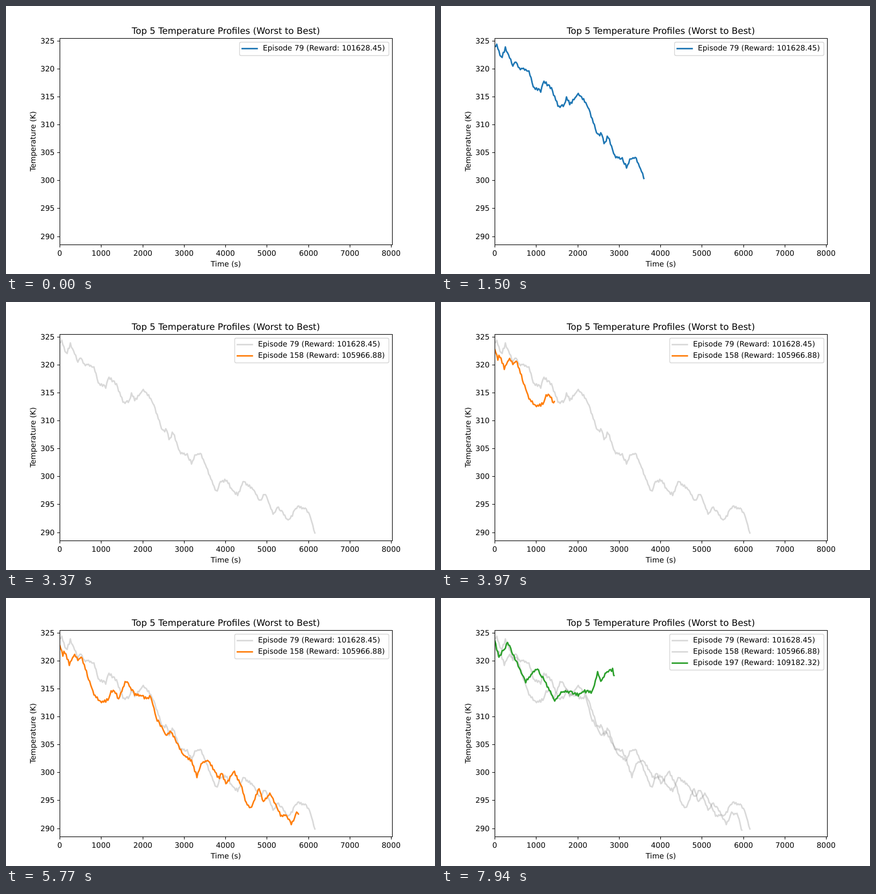
An HTML page for the animation above (8000 ms loop, 800 by 500 pixels).

```html
<!DOCTYPE html>
<html lang="en">
<head>
<meta charset="utf-8">
<title>Temperature profiles</title>
<style>
  html, body { margin: 0; width: 100%; height: 100%; overflow: hidden; background: #fff; }
  svg { display: block; width: 800px; height: 500px; }
  text { font: 13.89px "DejaVu Sans", sans-serif; fill: #000; text-rendering: geometricPrecision; }
  .title { font-size: 16.67px; }
  .mid { text-anchor: middle; }
  .end { text-anchor: end; }
  .axis { fill: none; stroke: #000; stroke-width: 1.11; }
  .line { fill: none; stroke-width: 2.78; stroke-linejoin: round; stroke-linecap: square; }
  .box { fill: #fff; fill-opacity: .8; stroke: #ccc; stroke-opacity: .8; stroke-width: 1.39; }
</style>
</head>
<body>
<svg viewBox="0 0 800 500">
  <clipPath id="plot"><rect x="100" y="60" width="620" height="385"/></clipPath>
  <g id="lines" clip-path="url(#plot)"></g>
  <g id="axes">
    <rect class="axis" x="100.5" y="60.5" width="620" height="385"/>
    <text class="title mid" x="410" y="52">Top 5 Temperature Profiles (Worst to Best)</text>
    <text class="mid" x="410" y="486">Time (s)</text>
    <text class="mid" transform="translate(55 252.5) rotate(-90)">Temperature (K)</text>
  </g>
  <g id="legend">
    <rect class="box" y="67.5" rx="2.8"/>
  </g>
</svg>
<script>
const LOOP = 8000, TICK = 60, FADED = '#808080';
const LEFT = 100, PX = 0.07729;  // plot edge, pixels per second of the time axis
const STRIDE = 144 * PX;         // pixels drawn per tick
const GRAIN = 2, ROUGH = 2.8;    // spacing and height of the zigzag, in pixels

// Each walk is a few key points "x,y" joined by a seeded zigzag.
const series = [
  { name: 'Episode 79 (Reward: 101628.45)', color: '#1f77b4', from: 0, seed: 79,
    keys: `100,76 104,74 113,98 120,78 135,112 139,102 145,116 164,122 173,152 186,158 192,141
      205,152 219,188 229,186 234,172 241,183 257,163 273,185 292,240 300,239 305,258 311,242
      325,282 338,285 346,301 354,284 364,284 392,354 401,335 411,332 424,354 433,359 443,334
      462,351 474,371 483,356 499,398 507,381 527,408 544,381 558,386 568,401 576,431` },
  { name: 'Episode 158 (Reward: 105966.88)', color: '#ff7f0e', from: 3370, seed: 158,
    keys: `100,88 106,108 109,99 118,123 127,106 135,116 140,109 150,138 165,182 177,195 190,190
      197,173 204,175 210,189 223,154 240,179 263,187 270,184 280,224 300,256 307,247 330,292
      345,302 356,333 365,307 378,303 397,337 402,326 411,348 425,323 440,353 448,384 457,392
      472,355 480,380 493,364 512,406 520,404 533,422 541,401 553,403 561,433` },
  { name: 'Episode 197 (Reward: 109182.32)', color: '#2ca02c', from: 6740, seed: 197,
    keys: `100,79 108,110 125,84 158,157 170,139 180,132 193,154 206,180 213,192 224,176 235,174
      258,181 266,174 282,175 292,140 299,156 308,139 320,134 323,145` }
];

const $ = id => document.getElementById(id);

function add(parent, tag, attrs, text) {
  const el = document.createElementNS('http://www.w3.org/2000/svg', tag);
  for (const key in attrs) el.setAttribute(key, attrs[key]);
  if (text !== undefined) el.textContent = text;
  return parent.appendChild(el);
}

function drawTicks() {
  const axes = $('axes');
  for (let s = 0; s <= 8000; s += 1000) {
    const x = Math.round(LEFT + s * PX);
    add(axes, 'path', { class: 'axis', d: `M${x + .5} 445.5v5` });
    add(axes, 'text', { class: 'mid', x: x + .2, y: 466 }, s);
  }
  for (let k = 290; k <= 325; k += 5) {
    const y = Math.round(64.65 + (325 - k) * 10.425);
    add(axes, 'path', { class: 'axis', d: `M100.5 ${y + .5}h-5` });
    add(axes, 'text', { class: 'end', x: 90.7, y: y + 5 }, k);
  }
}

function randomFrom(seed) {
  return () => (seed = (seed * 16807) % 2147483647) / 2147483647;
}

// Height at x on a polyline of [x, y] points
function heightAt(pts, x) {
  const i = Math.max(1, pts.findIndex(p => p[0] >= x));
  const [x0, y0] = pts[i - 1], [x1, y1] = pts[i];
  return y0 + (y1 - y0) * (x - x0) / (x1 - x0);
}

function makeWalk({ keys, seed }) {
  const marks = keys.trim().split(/\s+/).map(p => p.split(',').map(Number));
  const end = marks[marks.length - 1];
  const random = randomFrom(seed * 7919);
  const walk = [marks[0]];
  let side = 1;
  for (let x = LEFT + GRAIN; x < end[0]; x += GRAIN) {
    if (random() < .8) side = -side;
    walk.push([x, heightAt(marks, x) + side * ROUGH * random()]);
  }
  return [...walk, end];
}

// Path of the walk from the plot edge up to x
function trace(walk, x) {
  if (x <= LEFT) return '';
  x = Math.min(x, walk[walk.length - 1][0]);
  const pts = [...walk.filter(p => p[0] < x), [x, heightAt(walk, x)]];
  return 'M' + pts.map(p => p.map(v => v.toFixed(2)).join(' ')).join('L');
}

function setStroke(el, s, faded) {
  el.setAttribute('stroke', faded ? FADED : s.color);
  el.setAttribute('stroke-opacity', faded ? .3 : 1);
}

drawTicks();
const box = document.querySelector('.box');
for (const s of series) {
  s.walk = makeWalk(s);
  s.path = add($('lines'), 'path', { class: 'line' });
  s.key = add($('legend'), 'path', { class: 'line' });
  s.label = add($('legend'), 'text', {}, s.name);
}

let shown = '';
function draw(time) {
  const t = time % LOOP;
  const count = series.filter(s => t >= s.from).length;
  const steps = Math.floor((t - series[count - 1].from) / TICK);
  const state = count + ':' + steps;
  if (state === shown) return;
  shown = state;

  const left = count > 1 ? 426.5 : 435.5;
  box.setAttribute('x', left);
  box.setAttribute('width', 714 - left);
  box.setAttribute('height', 25 + (count - 1) * 21);

  series.forEach((s, i) => {
    const on = i < count, old = i < count - 1;
    for (const el of [s.path, s.key, s.label]) el.style.display = on ? '' : 'none';
    if (!on) return;
    const y = 79.5 + i * 21;
    s.key.setAttribute('d', `M${left + 5} ${y}h27.8`);
    s.label.setAttribute('x', left + 43.5);
    s.label.setAttribute('y', y + 3.5);
    s.path.setAttribute('d', trace(s.walk, old ? Infinity : LEFT + steps * STRIDE));
    setStroke(s.path, s, old);
    setStroke(s.key, s, old);
  });
}

const start = performance.now();
function frame() {
  draw(performance.now() - start);
  requestAnimationFrame(frame);
}
frame();
</script>
</body>
</html>
```
